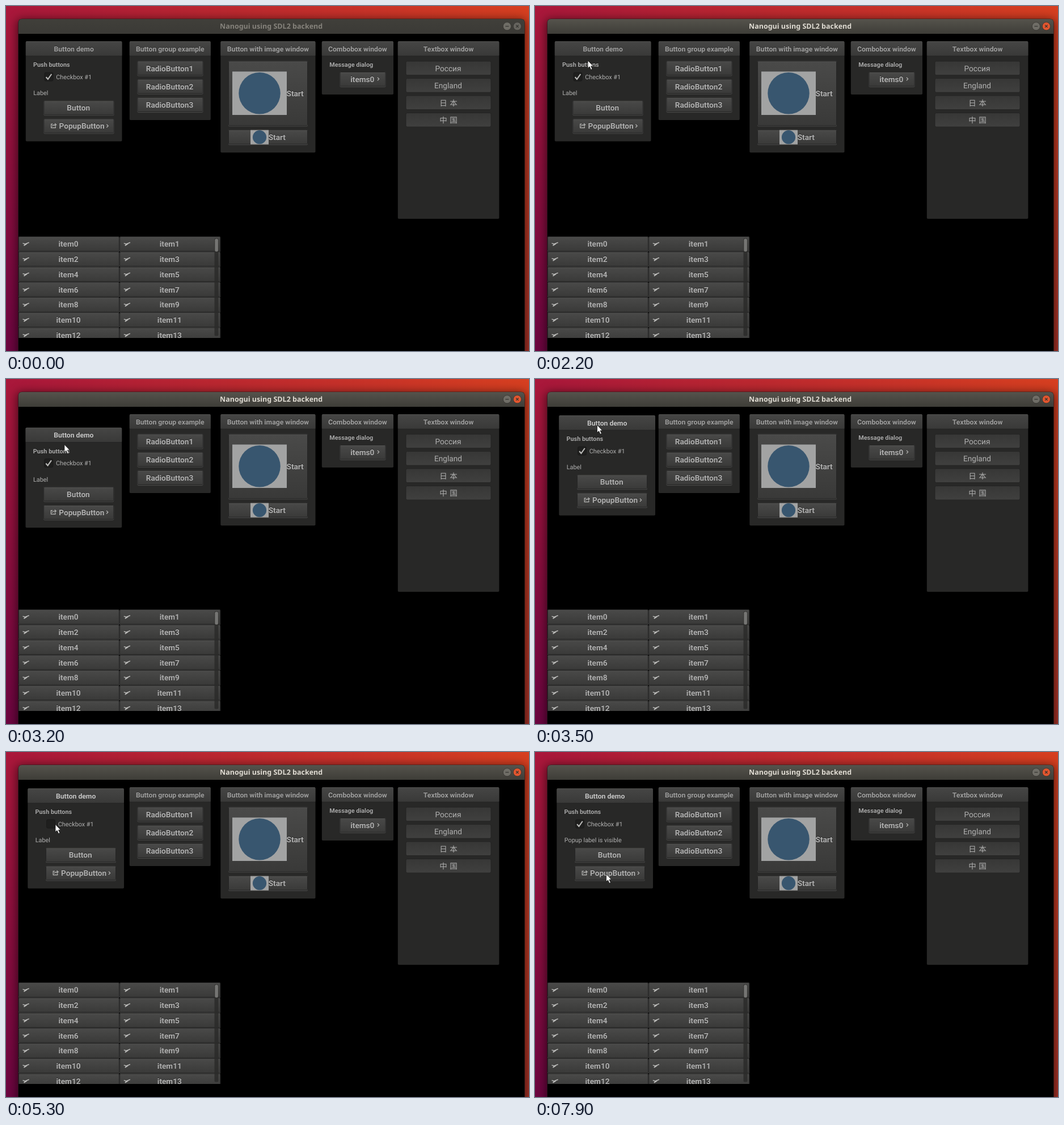
Recreate the animation shown at these times as an HTML page. Size 922x608 px, loop 8 s.

```html
<!DOCTYPE html>
<html lang="en">
<head>
<meta charset="utf-8">
<title>Widget demo</title>
<style>
html, body { margin: 0; width: 100%; height: 100%; overflow: hidden; background: #000; }
svg { display: block; width: 922px; height: 608px; }
text { font-family: Roboto, sans-serif; text-rendering: geometricPrecision; white-space: pre; }
.cjk { font-family: "Noto Sans CJK SC", "Noto Sans CJK JP", "Noto Sans CJK", sans-serif; }
.caption { font-family: "Noto Sans", "Open Sans", sans-serif; }
</style>
</head>
<body>
<svg id="stage" viewBox="0 0 922 608"></svg>
<script>
const LOOP = 8000, STEP = 100;
const TITLE = 12.2, BUTTON = 13.65, LABEL = 10.85;
const TOP = 62.3, PITCH = 26.75;
const stage = document.getElementById('stage');

const gradient = (id, from, to, across = 0) =>
  `<linearGradient id="${id}" x2="${across}" y2="${1 - across}">` +
  `<stop stop-color="${from}"/><stop offset="1" stop-color="${to}"/></linearGradient>`;

const rect = (x, y, w, h, fill, extra = '') =>
  `<rect x="${x}" y="${y}" width="${w}" height="${h}" fill="${fill}" ${extra}/>`;

const line = (d, width = 1.2, extra = '') =>
  `<path d="${d}" fill="none" stroke="#bbbbb9" stroke-width="${width}" ${extra}/>`;

// Text whose capitals are centred on cy, with a dark copy just above it
function label(str, x, cy, size, { weight = 400, anchor = 'start', alpha = .63, shade = .5, cls = '' } = {}) {
  const draw = (dy, color) =>
    `<text class="${cls}" x="${x}" y="${cy + size * .356 + dy}" font-size="${size}" ` +
    `font-weight="${weight}" text-anchor="${anchor}" fill="${color}">${str}</text>`;
  return (shade ? draw(-.9, `rgba(0,0,0,${shade})`) : '') + draw(0, `rgba(255,255,255,${alpha})`);
}

const bold = (str, x, cy, size = BUTTON, anchor = 'middle') =>
  label(str, x, cy, size, { weight: 700, anchor });

function button(x, y, w, h, id = '') {
  const frame = (dy, color) => rect(x + .5, y + dy, w - 1, h - 1.5, 'none',
    `rx="1.5" stroke="${color}" stroke-width=".9"`);
  return rect(x, y, w, h, 'url(#face)', `rx="2" ${id && `id="${id}"`}`) +
    frame(1.4, '#565655') + frame(.5, '#212121');
}

const chevron = (x, y) => line(`M${x - 1.4} ${y - 2.7}l2.7 2.7l-2.7 2.7`);

function panel(x, w, h, title, body, id = '') {
  return `<g ${id && `id="${id}"`}>` +
    rect(x, TOP, w, h, '#282827', 'rx="1.8"') +
    rect(x, TOP, w, 26, 'url(#head)', 'rx="1.8"') +
    rect(x + 1, TOP + .2, w - 2, .8, '#525251') +
    rect(x, TOP + 25.4, w, .9, '#202020') +
    `<g ${id && `id="${id}Title"`}>` +
    label(title, x + w / 2, 75.3, TITLE, { weight: 700, anchor: 'middle', alpha: .55, shade: .4 }) +
    '</g>' + body + '</g>';
}

// Grey picture with one plain disc in place of the mark
const picture = (x, y, w, h) =>
  rect(x, y, w, h, '#a2a3a3') +
  `<circle cx="${x + w / 2}" cy="${y + h / 2}" r="${h * .48}" fill="#38566f"/>`;

function field(str, i) {
  const y = 97.2 + i * 30.4, cy = y + 12.7;
  const latin = { anchor: 'middle', alpha: .6, shade: 0 };
  const glyphs = i < 2
    ? label(str, 779.5, cy, BUTTON, latin)
    : [...str].map((c, k) => label(c, 771 + k * 18, cy + .3, 13.5, { ...latin, weight: 500, cls: 'cjk' })).join('');
  return rect(705, y, 150, 24.6, 'url(#field)', 'rx="2.5" stroke="#212121" stroke-width=".8"') + glyphs;
}

function listItem(i) {
  const x = 22 + (i % 2) * 178.3, y = 406.2 + Math.floor(i / 2) * PITCH;
  return button(x, y, 177.8, PITCH) + bold('item' + i, x + 88, y + 13.4) +
    line('M.5 3.2L4.8 4.6L11.6 1.9M5.5 4.5L2.6 7.4L8 4', 1.5, `transform="translate(${x + 7} ${y + 8.7})"`);
}

const repeat = (n, draw) => Array.from({ length: n }, (_, i) => draw(i)).join('');

const demoBody =
  bold('Push buttons', 48, 103.4, LABEL, 'start') +
  rect(68, 117.2, 15, 15, '#1f1f1e', 'rx="2.5" stroke="#191919" stroke-width=".8"') +
  line('M70.6 125.3L73.9 129L80.3 120', 2.1, 'id="check"') +
  label('Checkbox #1', 88.2, 125, LABEL, { shade: 0 }) +
  `<text id="status" x="48.2" y="157.2" font-size="${LABEL}" fill="rgba(255,255,255,.63)"></text>` +
  button(66.5, 166.4, 124, 26.4, 'push') + bold('Button', 127.7, 179.4) +
  button(66.5, 198.5, 124, 26.4) + bold('PopupButton', 93.5, 211.5, BUTTON, 'start') +
  line('M82.5 208.2H79.7V214.6H87.3V212.2M81.8 212.2Q82.2 209.3 87 209.3M86 207L88.6 209.3L86 211.6') +
  chevron(178.8, 211.3);

const radioBody = repeat(3, i =>
  button(231.5, 96.5 + i * 32.15, 116, 26.6) + bold('RadioButton' + (i + 1), 288.5, 109.8 + i * 32.15));

const imageBody =
  button(392, 96.6, 140, 115.4) + picture(399, 115.5, 96, 76.5) +
  bold('Start', 494.5, 154.4, BUTTON, 'start') +
  button(392, 217.8, 140, 26.8) + picture(431, 218.6, 32, 25.2) +
  bold('Start', 462.7, 231.2, BUTTON, 'start');

const comboBody =
  bold('Message dialog', 570.2, 103.4, LABEL, 'start') +
  button(588.5, 116, 81, 26.6) + bold('items0', 628.3, 129.2) + chevron(656.3, 128.6);

const control = (cx, glyph, id) =>
  `<g transform="translate(${cx} 35.7)" stroke="#34332f">` +
  `<circle id="${id}" r="7.1" fill="#6f6d66" stroke-width=".8"/><path d="${glyph}" stroke-width="1.2"/></g>`;

stage.innerHTML = '<defs>' +
  gradient('face', '#4a4a49', '#393938') +
  gradient('pressed', '#292929', '#1d1d1d') +
  gradient('head', '#464645', '#393938') +
  gradient('field', '#373736', '#40403f') +
  gradient('bar', '#55534c', '#3d3c37') +
  gradient('idleBar', '#403f3a', '#3b3a36') +
  gradient('sky', '#a8173b', '#d63f20', 1) +
  gradient('left', '#a8173b', '#6c0540') +
  gradient('right', '#d23f20', '#a83226') +
  '<filter id="soft" x="-5%" y="-5%" width="110%" height="110%"><feGaussianBlur stdDeviation="9"/></filter>' +
  '<clipPath id="listClip"><rect x="22" y="405" width="357" height="180"/></clipPath></defs>' +
  rect(0, 0, 922, 24, 'url(#sky)') + rect(0, 23, 23, 585, 'url(#left)') +
  rect(913, 23, 9, 585, 'url(#right)') +
  rect(20, 24, 896, 620, '#000', 'opacity=".6" filter="url(#soft)"') +
  rect(21.3, 22.4, 893.4, 600, '#1c1a18', 'rx="7" opacity=".8"') +
  '<path id="bar" d="M22 50V29Q22 23 28 23H908Q914 23 914 29V50Z"/>' +
  rect(22, 49, 892, 560, '#000') +
  '<text id="caption" class="caption" x="467.6" y="40" font-size="12.5" font-weight="700" text-anchor="middle">Nanogui using SDL2 backend</text>' +
  control(883.4, 'M-3 0H3', 'minimise') + control(901.4, 'M-2.2 -2.2L2.2 2.2M-2.2 2.2L2.2 -2.2', 'close') +
  panel(34.8, 169.7, 176.2, 'Button demo', demoBody, 'demo') +
  panel(217.8, 143, 138.7, 'Button group example', radioBody) +
  panel(378.3, 167.2, 196, 'Button with image window', imageBody) +
  panel(556.8, 126.2, 93.8, 'Combobox window', comboBody) +
  panel(690.8, 178.6, 312.8, 'Textbox window', ['Россия', 'England', '日本', '中国'].map(field).join('')) +
  '<g clip-path="url(#listClip)">' + repeat(14, listItem) +
  rect(367.5, 409.5, 7, 172, '#2b2b2a', 'rx="2" opacity=".85"') +
  rect(368.3, 410.3, 5.6, 22.4, '#757573', 'rx="2"') + '</g>' +
  '<path id="cursor" d="M0 0V13.6L3.1 10.8L5.5 16.3L7.9 15.2L5.5 9.9H9.5Z" fill="#fff" stroke="#111" stroke-width=".8"/>';

const el = Object.fromEntries([...stage.querySelectorAll('[id]')].map(n => [n.id, n]));

const progress = (t, from, to) => Math.min(1, Math.max(0, (t - from) / (to - from)));
const ease = p => p * p * (3 - 2 * p);
const swing = p => Math.sin(Math.PI * p) ** 2;

// An eased shift by (dx, dy) between two times
const shift = (from, to, dx, dy) => t => {
  const p = ease(progress(t, from, to));
  return [dx * p, dy * p];
};

const sum = points => points.reduce(([x, y], [dx, dy]) => [x + dx, y + dy], [0, 0]);

// The panel is pulled down and let back up, then nudged into place
const pull = t => {
  const p = swing(progress(t, 2570, 3390));
  return [5 * p, 53 * p];
};
const nudges = [
  shift(3000, 3200, -2.5, 0), shift(3200, 3400, 12, 0), shift(3400, 3600, -4, 4),
  shift(3700, 3900, -3.5, 2.4), shift(4000, 4200, 1.5, -4.4)
];
const steers = [
  shift(1200, 2100, -46, -326), shift(2100, 2400, 12, -23),
  shift(4700, 4800, -12, 19), shift(4900, 5300, -6.5, 27.5), shift(5300, 5500, 16, 4),
  shift(6000, 6300, 14, 54), shift(7700, 7900, 8.5, 29.5)
];
const LAG = 65;

const settle = t => sum(nudges.map(f => f(t)));
const panelAt = t => sum([pull(t), settle(t)]);
const pointerAt = t => sum([[136, 428], ...steers.map(f => f(t)), pull(t - LAG), settle(t)]);

const move = (node, [x, y]) => node.setAttribute('transform', `translate(${x} ${y})`);
const paint = (node, fill) => node.setAttribute('fill', fill);
const show = (node, on) => node.setAttribute('visibility', on ? 'visible' : 'hidden');

function render(now) {
  const t = Math.floor((now % LOOP) / STEP) * STEP;
  const active = t >= 100;
  paint(el.bar, active ? 'url(#bar)' : 'url(#idleBar)');
  paint(el.caption, active ? '#dfdbd2' : '#85827b');
  paint(el.close, active ? '#e2562f' : '#66645e');

  move(el.demo, panelAt(t));
  paint(el.demoTitle.lastChild, `rgba(255,255,255,${t >= 2600 ? .74 : .55})`);
  show(el.check, t < 5300 || t >= 5700);
  paint(el.push, t === 7200 ? 'url(#pressed)' : 'url(#face)');
  el.status.textContent = t < 6500 ? 'Label'
    : t < 7300 ? 'Popup label is invisible' : 'Popup label is visible';

  show(el.cursor, t >= 1100);
  move(el.cursor, pointerAt(t));
}

const start = performance.now();
function tick() {
  render(performance.now() - start);
  requestAnimationFrame(tick);
}
tick();
</script>
</body>
</html>
```
